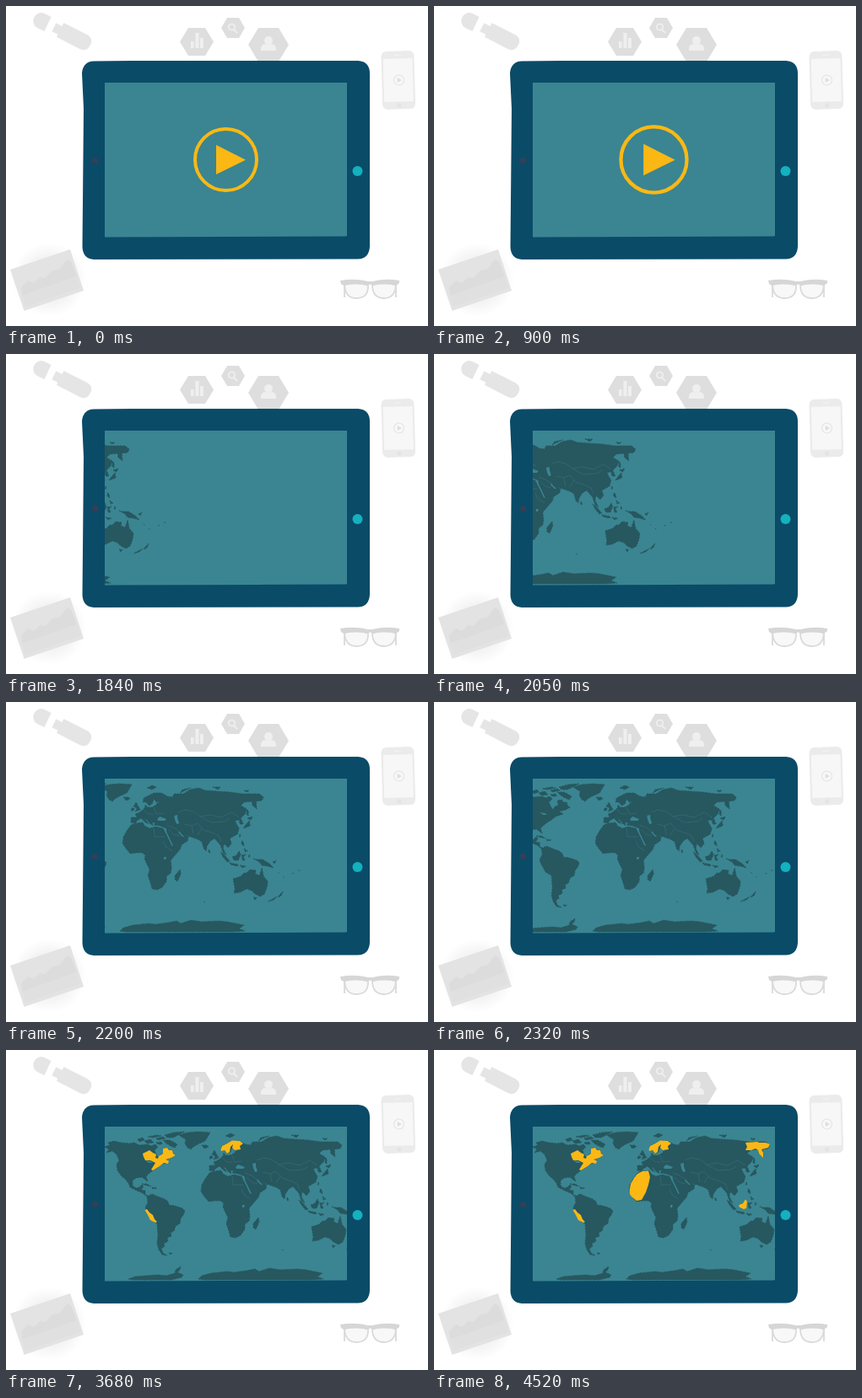
An HTML page for the animation above (7390 ms loop, 500 by 380 pixels).

```html
<!DOCTYPE html>
<html lang="en">
<head>
<meta charset="utf-8">
<title>World map on a tablet</title>
<style>
  html, body { margin: 0; width: 100%; height: 100%; overflow: hidden; background: #fff; }
  svg { display: block; width: 500px; height: 380px; }
  #land { fill: #27575f; stroke: #27575f; stroke-width: .9; stroke-dasharray: 2 1.6; }
  #water { fill: #3a8591; }
  #borders { fill: none; stroke: #3f7780; stroke-width: .5; }
  #regions { fill: #fbb814; }
</style>
</head>
<body>
<svg viewBox="0 0 500 380">
  <defs>
    <radialGradient id="haze">
      <stop offset=".6" stop-color="#f3f3f3"/>
      <stop offset="1" stop-color="#fff"/>
    </radialGradient>
    <path id="screen" d="M117 91H404V273L402 273.600L117 274.500Z"/>
    <clipPath id="screenClip"><use href="#screen"/></clipPath>
  </defs>

  <!-- memory stick -->
  <g fill="#e5e5e5">
    <path d="M53.500 13L45.500 30L38 26.500C31 23 31 15 35 11C39 7 43 7.500 47 9.500Z"/>
    <g transform="translate(82 37.500) rotate(27)">
      <path d="M-19 -9.500H11Q20 -9.500 20 0T11 9.500H-19Q-20 9.500 -20 8V-8Q-20 -9.500 -19 -9.500Z"/>
      <path d="M-28 -5H-18.800V6H-28Z"/>
    </g>
  </g>

  <!-- hexagon icons -->
  <g fill="#dedede">
    <path d="M206 42.500L216 26H236L246 42.500L236 59H216Z"/>
    <path d="M255 26L262 14H276L283 26L276 38H262Z"/>
    <path d="M287 46L299 26H323L335 46L323 66H299Z"/>
  </g>
  <g fill="#efefef">
    <path d="M219 42H222.500V50H219ZM224.500 32H228.500V50H224.500ZM230 38H234V50H230Z"/>
    <circle cx="311" cy="41" r="5"/>
    <path d="M302 53V50Q303 45 308 45Q311 47 314 45Q319 45 320 50V53Z"/>
  </g>
  <g fill="none" stroke="#efefef" stroke-width="1.800">
    <circle cx="267.500" cy="25" r="3.700"/>
    <path d="M270 28L274 32"/>
  </g>

  <!-- phone -->
  <g transform="translate(464.800 88) rotate(-1.700)">
    <rect x="-19.500" y="-34.500" width="39" height="69" rx="6" fill="#ebebeb"/>
    <rect x="-17.300" y="-25.500" width="34.600" height="51" fill="#f7f7f7"/>
    <path d="M-4 -30H4" stroke="#f5f5f5"/>
    <circle cy="30" r="2.800" fill="#e4e4e4"/>
    <circle cx=".8" r="6" fill="none" stroke="#e3e3e3"/>
    <path d="M-1 -3L4 0L-1 3Z" fill="#dedede"/>
  </g>

  <!-- chart print -->
  <circle cx="51" cy="325" r="44" fill="url(#haze)"/>
  <path d="M5 313L76 289L92 338L21.500 362Z" fill="#e3e3e3"/>
  <path d="M19 344L18 334L26 326L33 329L40 322L47 323L55 314L63 313L72 301L77 304L84 321Z" fill="#dcdcdc"/>
  <path d="M19 344L84 321L88 335L23 357Z" fill="#e0e0e0"/>

  <!-- glasses -->
  <g fill="#f8f8f8" stroke="#dadada" stroke-width="1.800">
    <path d="M401 331Q414 328 429 331Q430 347 415 347Q402 347 401 331Z"/>
    <path d="M434 331Q449 328 462 331Q461 347 448 347Q434 347 434 331Z"/>
    <path d="M401 332V346M462 332V346"/>
  </g>
  <path d="M396 326Q413 323 429 327H434Q450 323 466 326V329L462 332Q447 328 435 332Q431 329 428 332Q414 328 400 332L397 330Z" fill="#d6d6d6"/>

  <!-- tablet -->
  <path d="M104 65.500L150 65H417Q431 66 431 80V286Q430 300 417 300.500L104 301Q91 300 90.500 286L92 122L90 80Q91 66 104 65.500Z" fill="#0a4b68"/>
  <circle cx="105.500" cy="183.500" r="3.500" fill="#363f55"/>
  <circle cx="416.500" cy="196" r="6" fill="#14b1bf"/>
  <use href="#screen" fill="#3a8591"/>

  <g clip-path="url(#screenClip)">
    <g id="map">
      <g id="land">
        <!-- North America -->
        <path d="M117 115L123 113L121 110L128 108L136 110L146 111L152 110L158 113L168 112L172 114L177 112L180 115L176 119L178 124L181 128L183 124L187 123L186 117L191 116L193 119L197 119L198 123L201 125L196 128L188 130L193 133L184 136L179 140L174 143L169 147L166 150L168 156L165 154L161 151L154 152L150 155L150 161L154 164L158 163L161 160L163 162L160 166L165 167L165 172L171 174L168 175L162 170L155 167L147 163L145 158L141 153L137 150L132 143L131 136L134 131L131 124L126 120L119 122L122 118Z"/>
        <!-- Arctic islands, Greenland, Iceland -->
        <path d="M186 107L194 107L203 112L200 116L195 114L190 111ZM164 108L171 106L175 110L167 111ZM156 106L162 104L164 107L158 109ZM178 105L186 103L189 105L180 107ZM168 103L179 101L184 102L174 104ZM188 101L199 98L212 97L206 100L198 104L191 104ZM178 110L184 109L185 112L180 112Z"/>
        <path d="M205 101L215 98L228 97L242 98L239 103L236 108L227 112L222 115L219 118L215 116L212 111L213 106L209 104ZM232 113L238 113L240 115L235 117Z"/>
        <!-- Caribbean -->
        <path d="M161 159L167 159L172 162L167 161ZM173 163L179 164L174 165Z"/>
        <!-- South America -->
        <path d="M167 174L173 171L180 174L188 177L192 180L193 184L200 185L209 188L212 191L210 196L207 200L206 206L201 209L199 215L195 217L196 221L191 223L192 227L187 230L188 233L184 236L186 241L191 244L185 243L181 237L179 230L180 220L179 206L172 202L166 191L165 187L168 181ZM193 241L197 241L195 243Z"/>
        <!-- Europe and Asia -->
        <path d="M241 143L241 137L248 137L246 133L251 131L255 128L257 126L258 122L260 125L266 125L271 122L272 120L278 118L271 119L268 115L266 121L262 123L259 119L255 119L256 114L262 111L268 108L277 108L284 112L290 113L292 109L303 109L311 104L321 102L329 105L343 106L358 107L373 109L393 109L398 113L396 117L389 118L390 127L385 123L384 118L375 119L371 123L378 127L376 133L371 138L374 145L370 145L369 140L364 141L366 145L369 150L367 157L358 162L360 168L356 173L351 168L350 174L354 182L350 179L347 170L340 162L335 165L331 171L330 177L327 174L325 166L320 163L314 161L303 157L309 160L308 165L300 170L291 172L288 165L283 157L283 150L275 147L268 146L270 143L266 143L267 147L263 144L260 140L257 138L262 145L258 143L253 138L248 141L246 144Z"/>
        <!-- Northern islands and Britain -->
        <path d="M244 124L247 119L249 123L252 128L246 130L248 126ZM242 126L245 126L244 129L241 129ZM260 102L266 99L271 101L266 104ZM299 108L302 104L312 102L305 105ZM338 101L347 101L344 104ZM375 105L381 105L378 107Z"/>
        <!-- Africa -->
        <path d="M232 160L236 153L241 146L246 144L255 143L257 147L263 150L270 148L279 150L282 156L286 163L289 170L292 172L301 170L299 175L293 182L288 188L289 197L288 203L283 207L283 213L278 220L272 223L266 222L264 215L261 206L263 199L259 191L257 186L258 182L254 179L248 179L240 180L235 174L231 168ZM299 199L300 204L296 213L293 211L293 206Z"/>
        <!-- East Asian islands -->
        <path d="M378 128L380 129L380 135L378 134ZM379 138L385 136L383 140L380 139ZM381 141L382 147L377 149L374 150L376 147ZM370 157L371 160L369 160ZM372 165L374 166L375 171L372 169ZM375 174L379 177L376 178ZM333 175L335 178L333 179Z"/>
        <path d="M347 178L351 181L358 189L355 190L350 184ZM358 191L368 193L367 195L359 193ZM361 184L366 182L369 177L371 181L368 188L363 188ZM372 182L377 181L374 184L376 188L373 188ZM386 186L390 187L397 187L405 192L410 197L403 195L396 194L393 190ZM370 194L377 195L373 197ZM381 181L382 184L380 184ZM409 190L413 188L411 192Z"/>
        <!-- Australia, New Zealand, Pacific -->
        <path d="M362 210L371 207L375 203L378 203L382 199L389 200L388 204L393 206L396 197L398 207L403 213L402 220L399 228L394 231L388 228L384 224L378 222L370 226L363 227L364 222ZM386 232L390 232L388 235ZM421 225L419 230L415 232L417 229ZM414 231L410 235L403 237Z"/>
        <path d="M415 202L417 204M421 207L423 209M432 204L435 203M439 200L442 200M327 237L329 238"/>
        <!-- Antarctica -->
        <path d="M145 272L153 269L165 268L180 267L190 268L200 265L201 261L207 257L206 261L203 264L210 267L208 270L196 273L150 273Z"/>
        <path d="M228 272L232 268L243 265L262 263L270 264L285 262L295 260L300 263L312 259L325 261L345 260L355 261L375 265L369 269L376 272L360 273H235Z"/>
      </g>
      <g id="water">
        <path d="M272 139L275 136L283 139L281 141L273 141ZM292 135L296 134L296 138L298 144L295 145L293 140ZM280 184L283 184L282 187L280 187ZM165 131L171 132L174 134L169 134Z"/>
        <path d="M282 152L291 171L289 170L281 153ZM298 154L304 160L302 160L297 155Z"/>
      </g>
      <path id="borders" d="M297 131L305 128L315 130L323 136L335 134L348 137L360 131L369 137M323 136L336 143L352 142L358 138M304 145L313 147L320 144L327 152L339 156L345 159L348 166M313 147L315 157M320 158L325 150M283 146L291 149L300 155M285 151L291 157L298 159M268 125L271 133L280 132M256 128L262 133L268 133M268 150L269 160L281 160M279 165L282 172L290 177"/>
      <g id="regions">
        <path data-from="3110" d="M162 123L170 119L174 122L178 124L177 128L180 129L181 126L186 123L186 117L191 116L193 119L197 119L198 123L201 125L196 128L189 130L193 132L192 135L187 134L182 138L174 143L172 142L177 134L171 131L165 131L163 127Z"/>
        <path data-from="3380" d="M164.500 190L167 189L170 193L174 196L176 201L179 204L177 205L171 202L168 196Z"/>
        <path data-from="3680" d="M254.500 118L256 114L262 111L268 107.500L277 108L281 111L277 114L278 118L271 119L268 116L269 112L266 115L265 121L262 123L259 119L255 120Z"/>
        <path data-from="3980" d="M369 110L383 109L385 110L393 110L398 112L396 116L388 118L390 122L390 128L385 123L384 119L381 117L376 119L369 119L371 115Z"/>
        <path data-from="4250" d="M361 184L366 182L369 177L371 180L370 188L367 189L362 187Z"/>
        <path data-from="4520" d="M231.500 167L233 159L237 152L241 147L247 144L254 143.500L255 147L256 151L254 160L251 169L246 178L240 179L234 174L232 171Z"/>
      </g>
    </g>
  </g>

  <g id="button" fill="#fbb814">
    <circle r="36.500" fill="none" stroke="#fbb814" stroke-width="4"/>
    <path d="M-11.500 -17.500L23.500 .3L-11.500 17.500Z"/>
  </g>
</svg>
<script>
  const LOOP = 7390, STEP = 30;
  const button = document.getElementById('button');
  const map = document.getElementById('map');
  const regions = [...document.querySelectorAll('[data-from]')];

  // Number of motion steps already taken, the first one at `start`.
  const stepsSince = (t, start, count) =>
    Math.max(0, Math.min(count, Math.floor((t - start) / STEP) + 1));

  function buttonScale(n) {
    return n <= 3 ? 1 + 0.07 * n : 1.21 * (12 - n) / 9;
  }

  function draw() {
    const t = performance.now() % LOOP;
    const scale = buttonScale(stepsSince(t, 900, 12));
    button.setAttribute('transform', `translate(260.5 182.5) scale(${scale})`);
    button.style.display = scale > 0 ? '' : 'none';

    const slide = stepsSince(t, 1690, 25);
    map.setAttribute('transform', `translate(${-331.5 * (1 - slide / 25)} 0)`);
    map.style.display = slide ? '' : 'none';

    for (const region of regions)
      region.style.display = t >= +region.dataset.from ? '' : 'none';
    requestAnimationFrame(draw);
  }
  draw();
</script>
</body>
</html>
```
